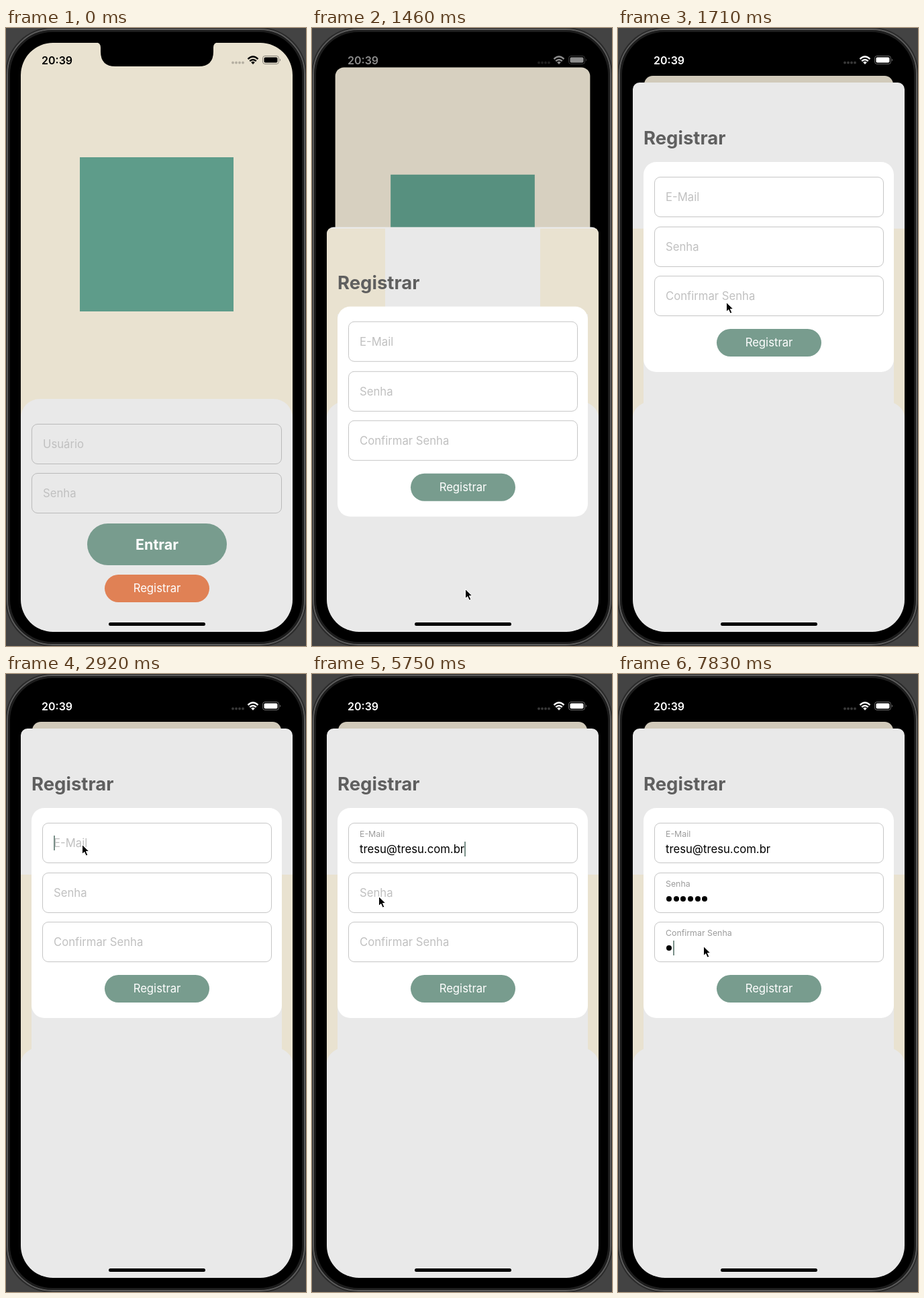
An HTML page that plays this animation: 447 by 918 pixels, repeating every 8 s.

```html
<!DOCTYPE html>
<html lang="pt-BR">
<head>
<meta charset="utf-8">
<title>Registrar</title>
<style>
@property --p { syntax: '<number>'; inherits: true; initial-value: 0; }
* { box-sizing: border-box; }
html, body { margin: 0; width: 100%; height: 100%; overflow: hidden; background: #434343; }
body { font: 16.7px/20px Inter, Roboto, sans-serif; }
div, svg, i, b, label { position: absolute; display: block; }
svg { left: 0; top: 0; overflow: visible; }

/* --p runs from 0 (sheet hidden) to 1 (sheet open) */
#stage { left: 0; top: 0; width: 447px; height: 918px; overflow: hidden; animation: open 8s infinite; }
@keyframes open {
  0%, 15.25% { --p: 0; animation-timing-function: cubic-bezier(.4, .1, .7, .8); }
  18.25% { --p: .741; animation-timing-function: linear; }
  18.75% { --p: .836; animation-timing-function: cubic-bezier(.25, .5, .4, 1); }
  21.375%, 100% { --p: 1; }
}

.phone { left: 1px; top: 1px; width: 445px; height: 916px; border-radius: 68px; background: #000;
  border: 2px solid #5c5c5c; box-shadow: inset 0 0 0 3px #1d1d1d, 0 0 0 2px #2a2a2a; }
.screen { inset: 0; clip-path: inset(22px 20px 21px 22px round 48px); }

.login { left: 22px; top: 22px; width: 405px; height: 875px; overflow: hidden;
  border-radius: 14px 14px 0 0; background: #e9e2d0; transform-origin: 50% 0;
  transform: translateY(calc(49px * var(--p))) scale(calc(1 - .084 * var(--p)));
  filter: brightness(calc(1 - .105 * var(--p))); }
.logo { left: 88px; top: 170px; width: 229px; height: 229px; background: #5e9c8a; }
.panel { left: 0; top: 529px; width: 405px; height: 346px; border-radius: 28px 28px 0 0; background: #e9e9e9; }

.sheet { left: 22px; top: 81px; width: 405px; height: 837px; overflow: hidden;
  border-radius: 10px 10px 0 0; background: #e9e9e9;
  transform: translateY(calc(837px * (1 - var(--p)))); }
.under { left: -22px; top: -81px; transform: translateY(calc(-837px * (1 - var(--p)))); }
.title { left: 16px; top: 66px; font-size: 27.5px; line-height: 32px; font-weight: 700; color: #5f5f5f; }
.card { left: 16px; top: 118px; width: 373px; height: 312px; border-radius: 19px; background: #fff; }

.field { left: 16px; height: 60px; border: 1px solid #c6c6c6; border-radius: 9px; }
.panel .field { width: 373px; border-color: #bababa; }
.card .field { width: 342px; }
.field label { left: 16px; top: 19px; white-space: nowrap; color: #c0c0c0; transform-origin: 0 50%; }
.value { left: 16px; height: 20px; display: flex; align-items: center; white-space: pre; color: #000; }
.value u { width: 8px; height: 8px; margin: 0 1.3px; border-radius: 50%; background: #000; }
.caret { left: 100%; top: -1px; width: 2px; height: 22px; background: #7b918a; }

.btn { left: 125px; width: 156px; height: 41px; border-radius: 21px; line-height: 41px;
  text-align: center; color: #fff; background: #789c8e; }
.card .btn { left: 109px; top: 248px; }
.panel .big { left: 99px; top: 185px; width: 208px; height: 62px; border-radius: 31px; font-size: 21.5px; font-weight: 700; line-height: 62px; }

.notch { fill: #000; }
.status { --c: calc(255 * var(--p) * var(--p)); color: rgb(var(--c) var(--c) var(--c)); }
.time { left: 53px; top: 38px; font-size: 16px; font-weight: 600; }
.home { left: 153px; top: 883px; width: 144px; height: 5px; border-radius: 3px; background: #000; }

.cursor { animation: move 8s ease-in-out infinite; }
@keyframes move {
  0%, .45% { transform: translate(108px, 186px); opacity: 0; animation-timing-function: step-end; }
  .5% { transform: translate(108px, 186px); opacity: 1; animation-timing-function: ease-in; }
  5.5% { transform: translate(270px, 640px); animation-timing-function: ease-out; }
  9.9%, 18.4% { transform: translate(228px, 833px); }
  21.2%, 23.5% { transform: translate(161px, 407px); }
  29.75% { transform: translate(117px, 264px); }
  33.3%, 62% { transform: translate(113px, 253px); }
  69%, 88% { transform: translate(99px, 330px); }
  93.5%, 100% { transform: translate(127px, 404px); opacity: 1; }
}
</style>
</head>
<body>
<div id="stage">
  <div class="phone"></div>

  <div class="screen">
    <div class="login">
      <div class="logo"></div>
      <div class="panel">
        <div class="field" style="top:37px"><label>Usuário</label></div>
        <div class="field" style="top:110px"><label>Senha</label></div>
        <div class="btn big">Entrar</div>
        <div class="btn" style="top:261px;background:#e08155">Registrar</div>
      </div>
    </div>
    <div class="sheet">
      <svg class="under" width="447" height="918" fill="#e9e2d0">
        <path d="M22 298H109V425H38V557Q22 565 22 579Z M427 298H340V425H411V557Q427 565 427 579Z"/>
      </svg>
      <div class="title">Registrar</div>
      <div class="card">
        <div class="field" style="top:22px"><label>E-Mail</label><div class="value"></div></div>
        <div class="field" style="top:96px"><label>Senha</label><div class="value"></div></div>
        <div class="field" style="top:169px"><label>Confirmar Senha</label><div class="value"></div></div>
        <div class="btn">Registrar</div>
      </div>
    </div>
  </div>

  <svg class="notch" width="447" height="60">
    <path d="M134 21Q141 22 141 29V35Q141 57 163 57H287Q309 57 309 35V29Q309 22 316 21Z"/>
  </svg>
  <div class="status">
    <div class="time">20:39</div>
    <svg width="447" height="60" fill="currentColor">
      <g opacity=".22">
        <circle cx="338" cy="51.5" r="1.9"/><circle cx="343" cy="51.5" r="1.9"/>
        <circle cx="348" cy="51.5" r="1.9"/><circle cx="353" cy="51.5" r="1.9"/>
      </g>
      <g fill="none" stroke="currentColor" stroke-width="2.4">
        <path d="M360.5 46.2Q368 39 375.5 46.2M363.2 49.2Q368 44.6 372.8 49.2"/>
      </g>
      <path d="M365.2 51Q368 48.6 370.8 51L368 54Z"/>
      <rect x="382.5" y="41.5" width="24" height="12" rx="3.5" fill="none" stroke="currentColor" opacity=".4"/>
      <rect x="384.5" y="43.5" width="20" height="8" rx="2"/>
      <path d="M408 45.5Q410 47.5 408 49.5Z" opacity=".5"/>
    </svg>
  </div>
  <div class="home"></div>
  <svg class="cursor" width="14" height="20">
    <path d="M.5 .5V14.5L3.8 11.5L6.2 17L8.8 15.9L6.4 10.5H10.8Z" fill="#000" stroke="#fff" stroke-width="1"/>
  </svg>
</div>

<script>
const LOOP = 8000, FLOAT = 140;
const DOT = '<u></u>', CARET = '<i class="caret"></i>';
const fields = [...document.querySelectorAll('.card .field')].map(el => ({
  label: el.querySelector('label'), value: el.querySelector('.value'), html: null
}));
const email = 'tresu@tresu.com.br';

// Key press times and focus span of each field
const script = [
  { chars: [...email], focus: [2900, 5830],
    keys: [3040, 3130, 3210, 3290, 3420, 3580, 4000, 4080, 4170, 4250, 4330, 4420, 4480, 4540, 4590, 4750, 4830, 4920] },
  { chars: Array(6).fill(DOT), focus: [5830, 7600], keys: [6100, 6260, 6420, 6580, 6830, 6920] },
  { chars: [DOT], focus: [7600, LOOP], keys: [7670] }
];
const blinkOff = [[3790, 4000], [5200, 5630], [7150, 7560]];
const within = (t, [a, b]) => t >= a && t < b;

function draw(t) {
  const lit = !blinkOff.some(span => within(t, span));
  script.forEach(({ chars, focus, keys }, i) => {
    const f = fields[i];
    const count = keys.filter(k => k <= t).length;
    const k = Math.min(1, Math.max(0, (t - keys[0]) / FLOAT));
    const html = chars.slice(0, count).join('') + (lit && within(t, focus) ? CARET : '');
    if (html !== f.html) f.value.innerHTML = f.html = html;
    f.value.style.top = count ? '28px' : '19px';
    f.label.style.transform = `translateY(${-13.5 * k}px) scale(${1 - .26 * k})`;
    f.label.style.color = k > .5 ? '#9c9c9c' : '';
  });
}

let start;
function tick(now) {
  start ??= now;
  draw((now - start) % LOOP);
  requestAnimationFrame(tick);
}
draw(0);
requestAnimationFrame(tick);
</script>
</body>
</html>
```
